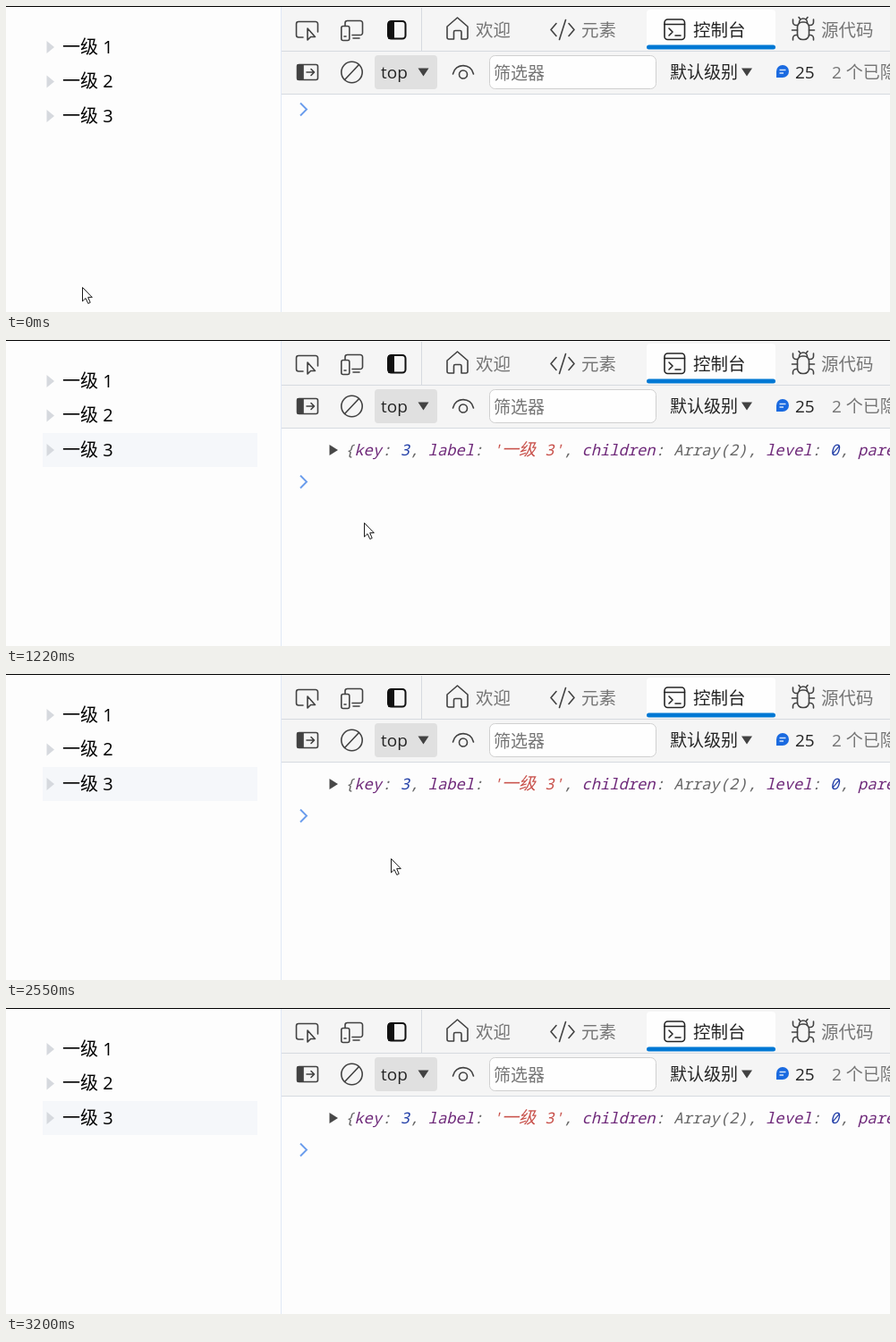
Recreate the animation shown at these times as an HTML page. Size 988 px wide and 342 px high, loop 3610 ms.

```html
<!DOCTYPE html>
<html lang="zh-CN">
<head>
<meta charset="utf-8">
<title>Tree and console</title>
<style>
  html, body { margin: 0; width: 100%; height: 100%; overflow: hidden; background: #fdfdfd; }
  svg { display: block; width: 988px; height: 342px; }
  text { font: 19.5px "Open Sans", "Noto Sans CJK SC", "Noto Sans CJK", sans-serif; white-space: pre; }
  .tree text { font-size: 20px; fill: #000; }
  .small text { font-size: 19px; }
  .muted { fill: #757575; }
  .dark { fill: #242424; }
  .icons { fill: none; stroke: #424242; stroke-width: 1.6; stroke-linecap: round; stroke-linejoin: round; }
  .icons .solid { fill: #424242; }
  .log text { font: italic 17.15px "Noto Sans Mono", "Noto Sans CJK SC", "Noto Sans CJK", monospace; fill: #666; }
  .log .key { fill: #6f2a7a; }
  .log .num { fill: #2440a8; }
  .log .str { fill: #c8504a; }
  .log .cjk { font-size: 19px; }
</style>
</head>
<body>
<svg viewBox="0 0 988 342">
  <rect width="988" height="342" fill="#fdfdfd"/>

  <rect id="highlight" x="41" y="104" width="240" height="38" fill="#f5f7fa"/>
  <g class="tree" id="tree"></g>

  <rect x="308" width="680" height="98" fill="#f5f5f5"/>
  <path d="M307.5 1V342" stroke="#e0e8f6"/>
  <path d="M308 50.5H988M308 98.5H988M464.5 2V50" stroke="#d6dae0"/>
  <rect x="716" y="4" width="144" height="45" rx="4" fill="#fefefe"/>
  <rect x="716" y="43.5" width="144" height="5" rx="2.5" fill="#0078d4"/>

  <g class="icons">
    <path d="M332 35H327a2.5 2.5 0 0 1-2.5-2.5V20a2.5 2.5 0 0 1 2.5-2.5H346a2.5 2.5 0 0 1 2.5 2.5V29M337 25V38L340.5 34.5H345.5Z"/>
    <path d="M379 22V19a2.5 2.5 0 0 1 2.5-2.5H396a2.5 2.5 0 0 1 2.5 2.5V30a2.5 2.5 0 0 1-2.5 2.5H387M388 36H395M378 34H380"/>
    <rect x="374.8" y="22.5" width="9" height="16" rx="2"/>
    <g stroke="#111" stroke-width="2">
      <rect x="427" y="17" width="19.5" height="19.5" rx="3.5"/>
      <path d="M428 18H433V36H428Z" fill="#111"/>
    </g>
    <path d="M493 23 504.5 13 516 23V35a2 2 0 0 1-2 2H509V29a1.5 1.5 0 0 0-1.5-1.5H502A1.5 1.5 0 0 0 500.5 29V37H495a2 2 0 0 1-2-2Z"/>
    <path d="M615 19.5 609 26.5 615 33.5M629 19.5 635 26.5 629 33.5M625.5 15.5 618.5 37.5"/>
    <g stroke="#242424">
      <rect x="736" y="15" width="22.5" height="22.5" rx="3.5"/>
      <path d="M736 20.5H758.5M741 25 745 29 741 33M748 33H754"/>
    </g>
    <rect x="884.5" y="18" width="13" height="19.5" rx="5.5"/>
    <path d="M886.5 18.5a4.5 4.5 0 0 1 9 0M886 12.5 888 15M896 12.5 894 15M879.5 15V18a3.5 3.5 0 0 0 3.5 3.5H884.5M902.5 15V18a3.5 3.5 0 0 1-3.5 3.500H897.5M878.5 27H884.5M897.5 27H903.5M879.500 38V36a3.500 3.500 0 0 1 3.500-3.500H884.500M902.500 38V36a3.500 3.500 0 0 0-3.500-3.500H897.500"/>
    <rect x="325.5" y="65.5" width="23" height="17" rx="2"/>
    <path class="solid" d="M326 66H332V82H326Z"/>
    <path d="M336 74H344M341 70.5 344.5 74 341 77.5"/>
    <circle cx="386.5" cy="74" r="11.7"/>
    <path d="M378.5 82.5 394.5 65.5"/>
    <path d="M499.5 76C502 63.5 520 63.5 522.5 76"/>
    <circle cx="511" cy="76.5" r="4.5"/>
  </g>

  <text class="muted" x="525" y="34">欢迎</text>
  <text class="muted" x="643" y="34">元素</text>
  <text class="dark" x="768" y="34">控制台</text>
  <text class="muted" x="911" y="34">源代码</text>

  <rect x="412" y="55" width="70" height="38" rx="4" fill="#e0e0e0"/>
  <rect x="540.5" y="55.5" width="186" height="37" rx="6" fill="#fefefe" stroke="#d0d0d0"/>
  <g class="small">
    <text class="dark" x="419" y="81">top</text>
    <text class="muted" x="545" y="82">筛选器</text>
    <text class="dark" x="742" y="81">默认级别</text>
    <text class="dark" x="882" y="81">25</text>
    <text class="muted" x="923" y="81">2 个已隐藏</text>
  </g>
  <path d="M460.5 69.5H472.5L466.5 78.5ZM822 69.5H834L828 78.5Z" fill="#424242"/>
  <path d="M861 80V73a7 7 0 1 1 7 7Z" fill="#1a6ae0"/>
  <path d="M864.5 71.5H871.5M864.5 75H869" stroke="#d5e5fa" stroke-width="1.3"/>

  <g class="log" id="log">
    <path d="M361.5 117 371 123 361.5 129Z" fill="#484848"/>
    <text y="129" x="379">{<tspan class="key">key</tspan>: <tspan class="num">3</tspan>, <tspan class="key">label</tspan>: <tspan class="str">'<tspan class="cjk">一级</tspan> 3'</tspan>, <tspan class="key">children</tspan>: Array(2), <tspan class="key">level</tspan>: <tspan class="num">0</tspan>, <tspan class="key">parent</tspan></text>
  </g>
  <path id="prompt" d="M329-7 336 0 329 7" fill="none" stroke="#6a9cec" stroke-width="1.9"/>
  <path d="M0 .5H988" stroke="#000"/>

  <g fill="#fff" stroke="#1c1c1c" stroke-linejoin="round">
    <path id="arrow" d="M.5 .5V16L4 12.6 6.8 18.5 9.2 17.4 6.7 11.6H11.3Z"/>
    <path id="hand" d="M-2 1.5Q0-1 2 1.5V8Q4 6.5 5.5 8.5 7.5 7.5 8.5 9.5 11 9 11 12V16Q11 18.5 9 20.5V23H0V21L-5 14.5Q-6 12-4 11.5L-2 13.5ZM2 8V12M5.5 8.5V12M8.5 9.5V12.5"/>
  </g>
</svg>
<script>
const LOOP = 3610, CLICK = 450, EXIT = 3190;
const el = id => document.getElementById(id);

// Pointer path: time in ms, x, y
const path = [
  [0, 85, 314], [40, 85, 314], [370, 107, 127], [850, 107, 127],
  [1340, 451, 217], [1540, 451, 217], [1580, 446, 210], [1780, 396, 196],
  [1960, 396, 196], [2190, 357, 207], [2230, 357, 207], [2400, 472, 164],
  [2550, 430, 206], [2880, 523, 101], [3040, 668, 220], [3170, 889, 316]
];

el("tree").innerHTML = [46, 84.5, 123].map((y, i) =>
  `<path d="M45.5 ${y - 7}L54 ${y} 45.5 ${y + 7}Z" fill="#d6d9de"/>` +
  `<text x="63" y="${y + 6.5}">一级 ${i + 1}</text>`).join("");

const slope = (i, axis) =>
  (path[i + 1][axis] - path[i][axis]) / (path[i + 1][0] - path[i][0]);

function tangent(i, axis) {
  if (i === 0 || i === path.length - 1) return 0;
  const a = slope(i - 1, axis), b = slope(i, axis);
  return a * b <= 0 ? 0 : 2 * a * b / (a + b);
}

// Monotone cubic, so the pointer never overshoots a resting place
function along(t, axis) {
  const next = path.findIndex(p => p[0] > t);
  if (next < 0) return path[path.length - 1][axis];
  const i = next - 1, span = path[next][0] - path[i][0];
  const u = (t - path[i][0]) / span, v = 1 - u;
  return path[i][axis] * (1 + 2 * u) * v * v + path[next][axis] * u * u * (3 - 2 * u) +
    span * u * v * (tangent(i, axis) * v - tangent(next, axis) * u);
}

const show = (id, on) => el(id).setAttribute("visibility", on ? "visible" : "hidden");

function draw(t) {
  const x = Math.round(along(t, 1)), y = Math.round(along(t, 2));
  const overRow = x > 41 && x < 281 && y > 27 && y < 142;
  const logged = t >= CLICK, present = t < EXIT;
  show("highlight", logged || overRow);
  show("log", logged);
  show("arrow", present && !overRow);
  show("hand", present && overRow);
  el("prompt").setAttribute("transform", `translate(0 ${logged ? 158.5 : 115.5})`);
  for (const id of ["arrow", "hand"]) {
    el(id).setAttribute("transform", `translate(${x} ${y})`);
  }
}

const start = performance.now();
function tick() {
  draw((performance.now() - start) % LOOP);
  requestAnimationFrame(tick);
}
tick();
</script>
</body>
</html>
```
